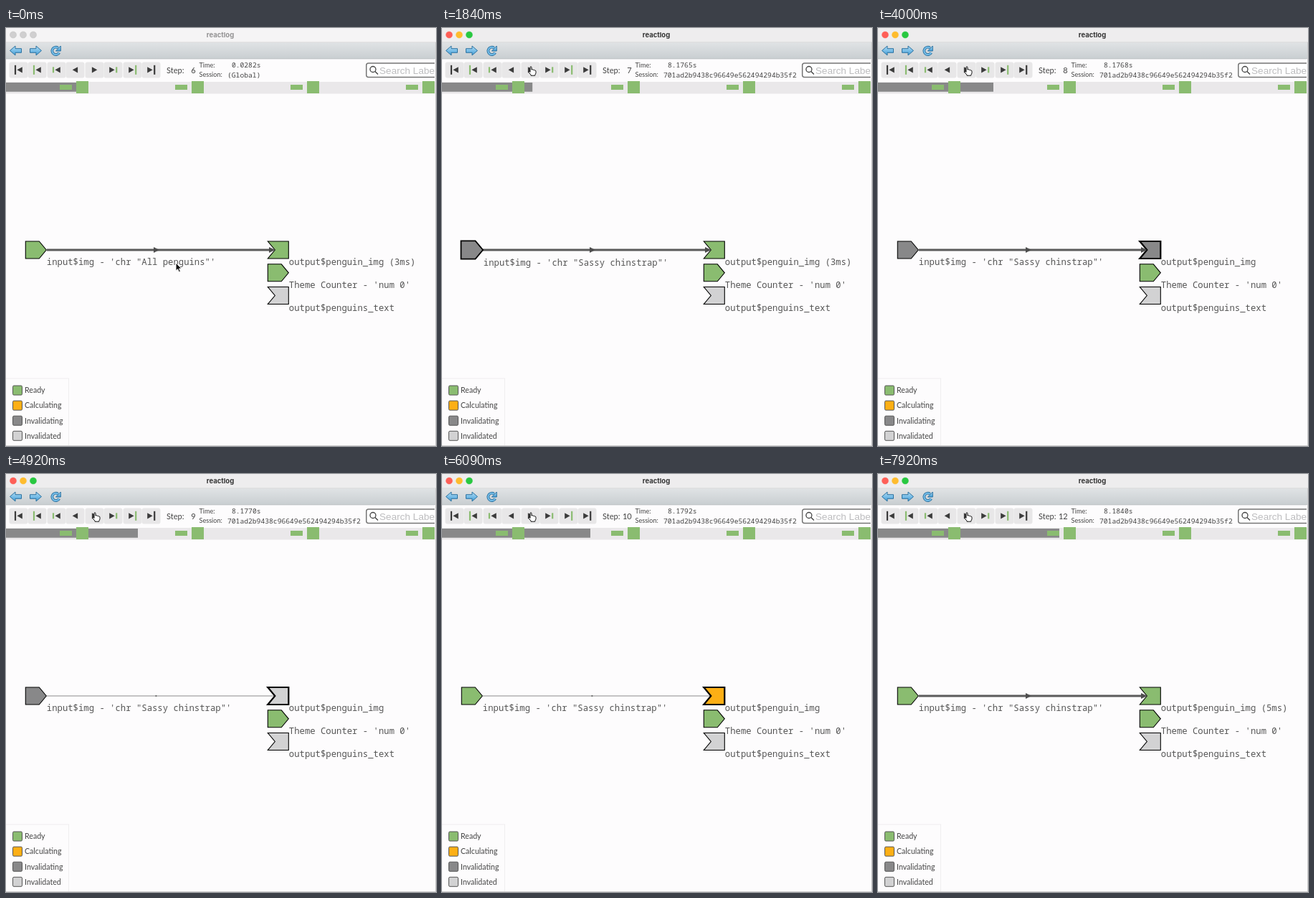
An HTML page that plays this animation: 600 px wide and 582 px high, repeating every 8 s.

```html
<!DOCTYPE html>
<html lang="en">
<head>
<meta charset="utf-8">
<title>reactlog</title>
<style>
html, body { margin: 0; width: 100%; height: 100%; overflow: hidden; background: #fdfcfd; }
svg { display: block; width: 600px; height: 582px; }
text { white-space: pre; fill: #444; font-family: Lato, "Open Sans", sans-serif; }
.mono { font-family: "Noto Sans Mono", "DejaVu Sans Mono", monospace; }
.label { font-size: 12.28px; fill: #555; }
.val { font-size: 9.68px; }
.key { font-size: 9.1px; }
</style>
</head>
<body>
<svg id="stage" viewBox="0 0 600 582">
  <defs>
    <linearGradient id="tool" x2="0" y2="1"><stop stop-color="#e0e3e5"/><stop offset="1" stop-color="#c9ced1"/></linearGradient>
    <linearGradient id="blue" x2="0" y2="1"><stop stop-color="#b5e0f8"/><stop offset="1" stop-color="#3f9cd6"/></linearGradient>
  </defs>
</svg>
<script>
const LOOP = 8000, BAR_MS = 187, PULSE_MS = 150;
const GREEN = '#8abc70', ORANGE = '#fdaf15', DARK = '#888889', LIGHT = '#d2d2d3';
const SESSION = '701ad2b9438c96649e562494294b35f2';
const svg = document.getElementById('stage');

function add(tag, attrs, parent = svg) {
  const el = document.createElementNS('http://www.w3.org/2000/svg', tag);
  set(el, attrs);
  parent.append(el);
  return el;
}
function set(el, attrs) {
  for (const k in attrs) el.setAttribute(k, attrs[k]);
}
const rect = (x, y, width, height, fill, more) => add('rect', { x, y, width, height, fill, ...more });
const path = (d, fill, more, parent) => add('path', { d, fill, ...more }, parent);
function text(x, y, str, more) {
  const el = add('text', { x, y, ...more });
  el.textContent = str;
  return el;
}
const clamp = v => Math.max(0, Math.min(1, v));

// Window frame
rect(0, 0, 600, 582, '#fdfcfd');
const titleBar = rect(0, 0, 600, 20, '#f5f4f5');
const title = text(299, 13, 'reactlog', {
  'text-anchor': 'middle', style: 'font: 700 9.5px Inter, sans-serif'
});
const lights = [10, 24, 38].map(cx => add('circle', { cx, cy: 9.5, r: 4.5, 'stroke-width': .5 }));
rect(0, 20, 600, 23, 'url(#tool)');
rect(0, 19.5, 600, .7, '#d4d3d4');
rect(0, 42.5, 600, .8, '#b9bdbf');

const iconLine = { stroke: '#2c719f', 'stroke-width': 1, 'stroke-linejoin': 'round' };
const arrowD = 'M5.5 31.5L13 25V28.7H21.5V34.3H13V38Z';
path(arrowD, 'url(#blue)', iconLine);
path(arrowD, 'url(#blue)', { ...iconLine, transform: 'translate(55 0) scale(-1 1)' });
const curl = 'M74.2 34.3A5.2 5.2 0 1 1 72.6 27.6';
path(curl, 'none', { stroke: '#2c719f', 'stroke-width': 3.8 });
path(curl, 'none', { stroke: '#74bde8', 'stroke-width': 2 });
path('M76.3 25V32H69.5Z', 'url(#blue)', iconLine);

// Step buttons: centre, direction, bar colour, bar height
const INK = '#3b3b3b';
[[17, -1, INK, 13], [43, -1, GREEN, 13], [70, -1, GREEN, 8], [96, -1],
 [123, 1], [149, 1, GREEN, 8], [176, 1, GREEN, 13], [202, 1, INK, 13]].forEach(([x, dir, col, h]) => {
  rect(x - 12.5, 47.5, 26, 22, '#e8e7e8', { rx: 3 });
  const mid = x + .5 - (h ? dir * 1.7 : 0);
  path(`M${mid - dir * 3.6} 54.2L${mid + dir * 3.8} 58.3L${mid - dir * 3.6} 62.4Z`, INK);
  if (h) rect(x - .5 + dir * 4.6, 58.3 - h / 2, 2.2, h, col);
});

text(224, 63, 'Step:', { 'font-size': 11.1 });
const stepNo = text(264.8, 63, '', { 'font-size': 11.1, 'text-anchor': 'end' });
text(269.5, 55, 'Time:', { class: 'key' });
text(269.5, 68, 'Session:', { class: 'key' });
const time = text(355.5, 55, '', { class: 'mono val', 'text-anchor': 'end' });
const session = text(309, 68.5, '', { class: 'mono val' });

rect(502.8, 49, 110, 19.5, '#fff', { rx: 3, stroke: '#767676', 'stroke-width': 1.5 });
add('circle', { cx: 512, cy: 57.5, r: 4, fill: 'none', stroke: '#444', 'stroke-width': 1.3 });
path('M515 60.5L519 64.5', 'none', { stroke: '#444', 'stroke-width': 1.5 });
text(521, 63.5, 'Search Label', { style: 'font: 13.6px "Liberation Sans", Arial, sans-serif; fill: #bdbdbf' });
rect(598, 43, 2, 539, '#fdfcfd');

// Timeline
rect(0, 75, 600, 16.5, '#eae8ea');
const bar = rect(0, 76, 115, 12.7, DARK);
for (let i = 0; i < 4; i++) {
  const x = 75 + i * 161;
  rect(x, 79, 17, 7, GREEN);
  rect(x + 23, 74, 17, 17, GREEN);
}

// Graph
const edge = add('g', {});
const shaft = path('', 'none', { stroke: '#5b5b5b' }, edge);

const SHAPES = {
  source: 'M-14.5 -12H4.5L14.5 0L4.5 12H-14.5Z',
  sink: 'M-14.5 -12H14.5V12H-14.5L-4.5 0Z'
};
function node(shape, x, y, fill, str) {
  const body = path(SHAPES[shape], fill, {
    stroke: '#000', 'stroke-width': 1.1, transform: `translate(${x} ${y})`
  });
  return { x, y, body, label: text(x + 15, y + 21.3, str, { class: 'mono label' }) };
}
const input = node('source', 41.8, 309, GREEN, '');
const output = node('sink', 379.8, 309, GREEN, '');
node('source', 379.8, 340.8, GREEN, "Theme Counter - 'num 0'");
node('sink', 379.8, 372.5, LIGHT, 'output$penguins_text');
const heads = add('g', { fill: '#4e4e4e' });
path('M206 305L214 309L206 313Z', null, {}, heads).removeAttribute('fill');
path('M367 305L375.5 309L367 313Z', null, {}, heads).removeAttribute('fill');
const dot = rect(208.5, 308.2, 1.8, 1.6, '#555');

function drawNode(n, fill, stroke, str, pulse) {
  set(n.body, {
    fill, 'stroke-width': stroke,
    transform: `translate(${n.x} ${n.y}) scale(${1 + .055 * pulse})`
  });
  set(n.label, { x: n.x + 15 + pulse, y: n.y + 21.3 + pulse });
  n.label.textContent = str;
}

// Legend
rect(-1, 488, 88.5, 100, '#fdfcfd', { stroke: '#efeeef' });
[['Ready', GREEN], ['Calculating', ORANGE], ['Invalidating', DARK], ['Invalidated', LIGHT]].forEach(([str, col], i) => {
  const y = 498 + i * 21.1;
  rect(9.5, y, 13, 13, col, { rx: 1.5, stroke: '#555', 'stroke-width': 1 });
  text(26, y + 10.3, str, { 'font-size': 10.6 });
});
rect(0, 581, 600, 1, '#cfcecf');
rect(599, 20, 1, 562, '#cfcecf');

// Pointers, tip at the origin
const line = { stroke: '#fff', 'stroke-width': 1, 'stroke-linejoin': 'round' };
const arrow = path('M0 0V11.2L2.6 8.8L4.4 12.8L6.4 11.9L4.7 8H8Z', '#111', line);
const hand = path('M-1 .8Q0 -.6 1 .8V4.4Q2.4 3.4 3.2 4.8Q4.6 4 5.2 5.4Q7 5 7 6.8V9Q6.6 10.6 5.8 11.6V12.6H0V11.6L-3 8.2Q-3.6 6.4 -2 6.8L-1 7.8Z',
  '#fff', { stroke: '#111', 'stroke-width': 1, 'stroke-linejoin': 'round', transform: 'translate(124 53.6)' });

// start, step, time, bar end, input fill, output fill, edge on, active node, stroke, run time
const STEPS = [
  [0,    6,  '0.0282s', 115, GREEN, GREEN,  1, null, 1.1, ' (3ms)'],
  [1750, 7,  '8.1765s', 138, DARK,  GREEN,  1, input, 1.7, ' (3ms)'],
  [2915, 8,  '8.1768s', 161, DARK,  DARK,   1, output, 2.2, ''],
  [4085, 9,  '8.1770s', 184, DARK,  LIGHT,  0, output, 2.2, ''],
  [5165, 10, '8.1792s', 207, GREEN, ORANGE, 0, output, 2.2, ''],
  [6410, 11, '8.1801s', 230, GREEN, ORANGE, 1, output, 2.2, ''],
  [7585, 12, '8.1840s', 253, GREEN, GREEN,  1, output, 1.1, ' (5ms)']
];
const MOVES = [[0, 237, 327], [60, 237, 327], [165, 73, 36], [330, 73, 36], [600, 124, 54], [LOOP, 124, 54]];

function pointerAt(t) {
  const i = MOVES.findIndex(m => m[0] > t);
  const [t0, x0, y0] = MOVES[i - 1], [t1, x1, y1] = MOVES[i];
  const p = (t - t0) / (t1 - t0), e = p * p * (3 - 2 * p);
  return [x0 + (x1 - x0) * e, y0 + (y1 - y0) * e];
}

function render(t) {
  const i = STEPS.findLastIndex(s => s[0] <= t);
  const [start, no, clock, end, inFill, outFill, on, active, stroke, took] = STEPS[i];
  const age = t - start, focus = i > 0;
  const from = focus ? STEPS[i - 1][3] : end;

  titleBar.setAttribute('fill', focus ? '#eeedee' : '#f5f4f5');
  title.style.fill = focus ? '#333' : '#929192';
  ['#fe5f57', '#febc2e', '#28c840'].forEach((c, k) =>
    set(lights[k], { fill: focus ? c : '#d0cfd0', stroke: focus ? c : '#bdbcbd' }));

  stepNo.textContent = no;
  time.textContent = clock;
  session.textContent = focus ? SESSION : '(Global)';
  bar.setAttribute('width', from + (end - from) * clamp(age / BAR_MS));

  set(shaft, { d: on ? 'M57 309H372' : 'M57 309H374', 'stroke-width': on ? 3 : .7 });
  heads.setAttribute('visibility', on ? 'visible' : 'hidden');
  dot.setAttribute('visibility', on ? 'hidden' : 'visible');

  const pulse = 1 - clamp((age - PULSE_MS + 30) / 30);
  const look = n => n === active ? [stroke, pulse] : [1.1, 0];
  const [inW, inP] = look(input), [outW, outP] = look(output);
  drawNode(input, inFill, inW, `input$img - 'chr "${focus ? 'Sassy chinstrap' : 'All penguins'}"'`, inP);
  drawNode(output, outFill, outW, 'output$penguin_img' + took, outP);

  const [x, y] = pointerAt(t);
  set(arrow, { transform: `translate(${x} ${y})`, visibility: focus ? 'hidden' : 'visible' });
  hand.setAttribute('visibility', focus ? 'visible' : 'hidden');
}

const begin = performance.now();
function tick() {
  render((performance.now() - begin) % LOOP);
  requestAnimationFrame(tick);
}
render(0);
requestAnimationFrame(tick);
</script>
</body>
</html>
```
